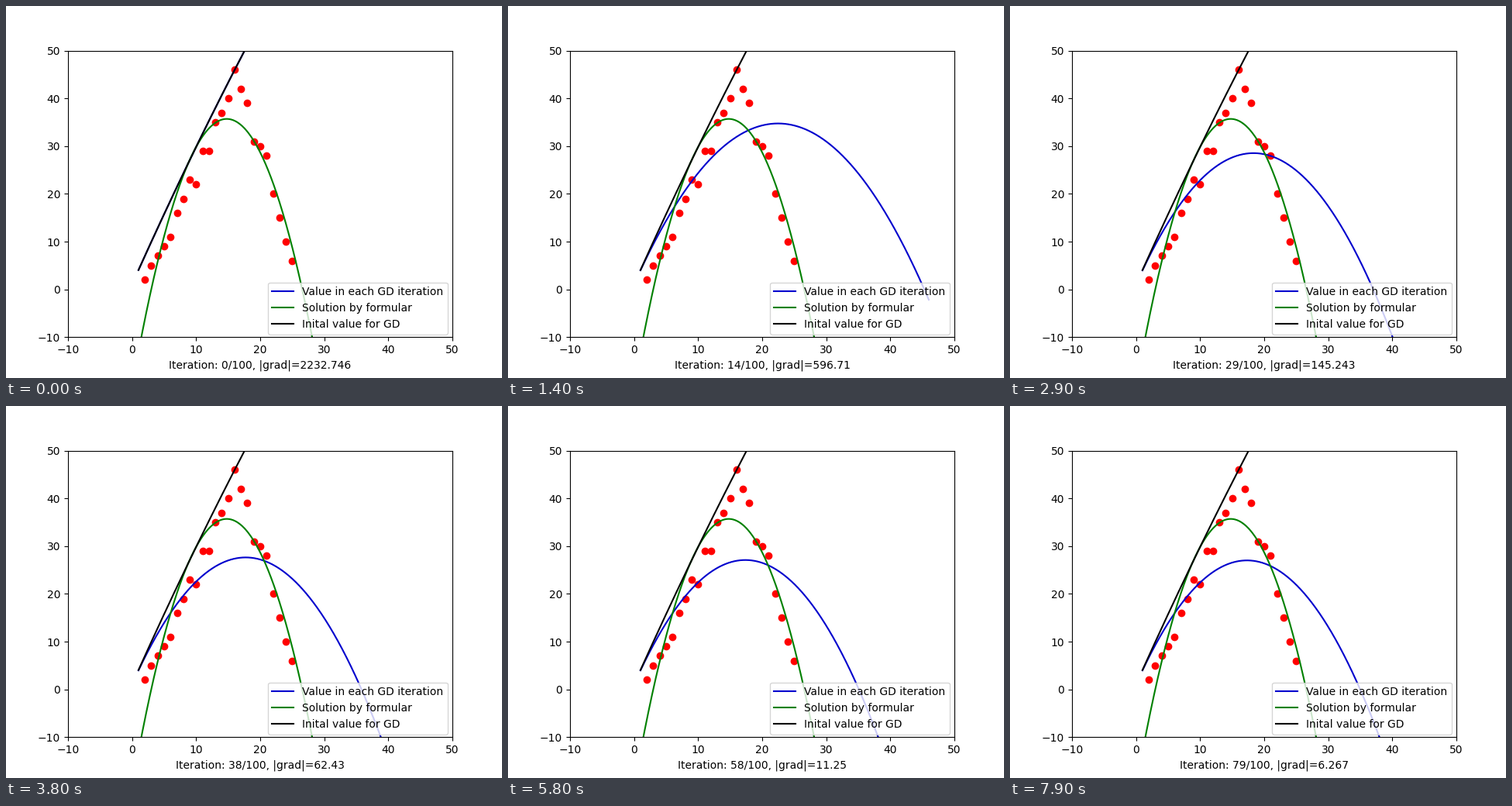
These frames come from a looping animation (640x480 px, 8 s). A matplotlib script:

```python
import numpy as np
import matplotlib.pyplot as plt
from matplotlib.animation import FuncAnimation

STEPS = 80
RATE = 1e-6

# Data points and design matrix for y = a x^2 + b x + c
px = np.arange(2, 26)
py = np.array([2, 5, 7, 9, 11, 16, 19, 23, 22, 29, 29, 35,
               37, 40, 46, 42, 39, 31, 30, 28, 20, 15, 10, 6])
A = np.vander(px.astype(float), 3)


def gradient(w):
    return A.T @ (A @ w - py) / len(py)


def descend(w, steps):
    path = [w]
    for _ in range(steps - 1):
        path.append(path[-1] - RATE * gradient(path[-1]))
    return path


start = np.array([-0.0122, 3.001101, 1.0475])
best = np.linalg.solve(A.T @ A, A.T @ py)
path = descend(start, STEPS)
xs = np.linspace(1, 46, 1000)

fig, ax = plt.subplots(figsize=(6.4, 4.8), dpi=100)
ax.set(xlim=(-10, 50), ylim=(-10, 50))
ax.plot(px, py, "ro")
current, = ax.plot([], [], color="mediumblue", label="Value in each GD iteration")
ax.plot(xs, np.polyval(best, xs), color="green", label="Solution by formular")
ax.plot(xs, np.polyval(start, xs), color="black", label="Inital value for GD")
ax.legend(loc=(0.52, 0.01))


def update(i):
    w = path[i]
    norm = np.linalg.norm(gradient(w)) / len(w)
    current.set_data(xs, np.polyval(w, xs))
    ax.set_xlabel(f"Iteration: {i}/100, |grad|={round(float(norm), 3)}")
    return current,


anim = FuncAnimation(fig, update, frames=STEPS, interval=100,
                     repeat=True, repeat_delay=0, blit=False)
plt.show()
```
